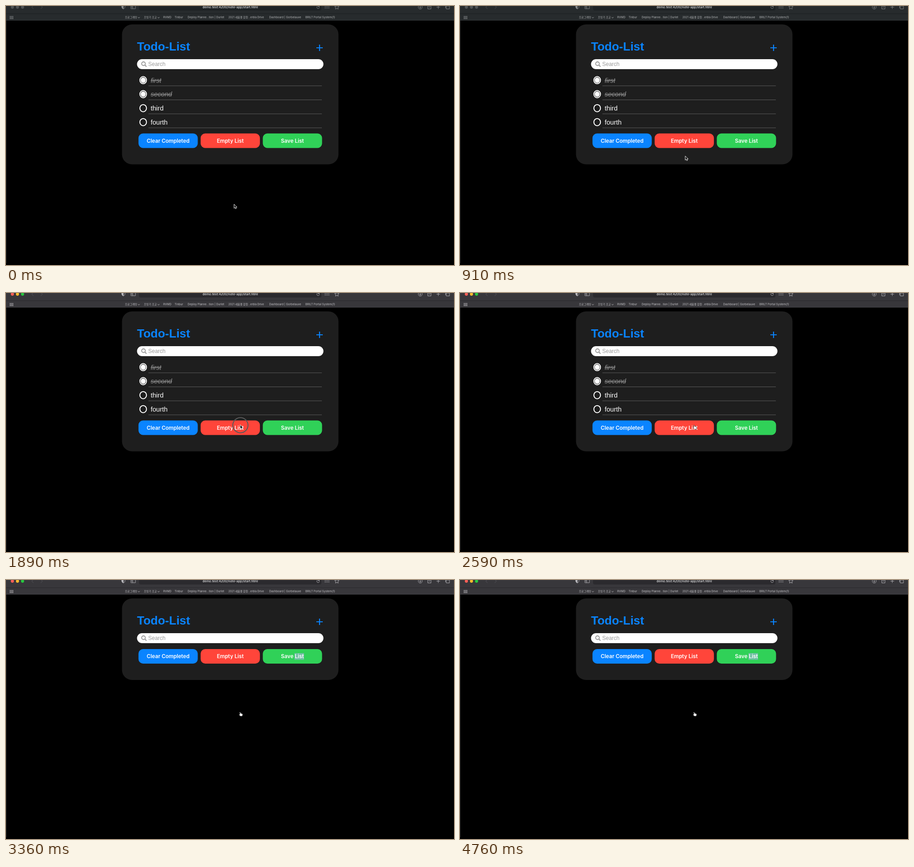
An HTML page for the animation above (5040 ms loop, 983x570 px).

```html
<!DOCTYPE html>
<html lang="en">
<head>
<meta charset="utf-8">
<title>Todo-List</title>
<style>
  html, body { margin: 0; width: 100%; height: 100%; overflow: hidden; background: #000; }
  svg { display: block; width: 983px; height: 570px; }
  text { font-family: "Liberation Sans", Arial, sans-serif; white-space: pre; }
  .ui { font-family: Inter, "Noto Sans CJK KR", "Noto Sans CJK", sans-serif; }
  .line { fill: none; stroke-linecap: round; stroke-linejoin: round; }

  #win { --bar: #272b2d; --field: #1e2224; --rule: #1b1e20; --edge: #34383a;
         --icon: #85888a; --dim: #4c5052; --mark: #b4b6b8;
         --l0: #505456; --l1: #505456; --l2: #505456; }
  #win.active { --bar: #38373b; --field: #2b2a2e; --rule: #29282c; --edge: #444347;
         --icon: #b5b4b8; --dim: #55545a; --mark: #c4c3c7;
         --l0: #ff5f57; --l1: #febc2e; --l2: #28c840; }
  #icons { stroke: var(--icon); stroke-width: .9; }
  #marks text { font-size: 6.1px; fill: var(--mark); }
  #marks .ko { font-size: 5.8px; }

  #items text { font-size: 14.5px; fill: #fff; }
  #items .done { fill: #8f8f8f; font-style: italic; text-decoration: line-through; }
  #buttons text { font-size: 11.6px; font-weight: 600; fill: #fff; text-anchor: middle; }
</style>
</head>
<body>
<svg viewBox="0 0 983 570">
  <rect width="983" height="570"/>
  <path d="M.5 32V566" stroke="#2b2b2b"/>

  <g id="win">
    <rect width="983" height="32" fill="var(--bar)"/>
    <path d="M0 17H983" stroke="var(--rule)"/>
    <path d="M0 31.5H983" stroke="var(--edge)"/>
    <rect x="292" y="-10" width="400" height="20" rx="4" fill="var(--field)"/>
    <circle cx="14" cy="2.5" r="3.4" fill="var(--l0)"/>
    <circle cx="25.2" cy="2.5" r="3.4" fill="var(--l1)"/>
    <circle cx="36.3" cy="2.5" r="3.4" fill="var(--l2)"/>
    <path class="line" stroke="var(--dim)" d="M60-1L56.5 2.5L60 6M76.5-1L80 2.5L76.5 6"/>
    <g id="icons" class="line">
      <path d="M257.5-2L261-1V2.5Q261 5 257.5 6.5Q254 5 254 2.5V-1Z"/>
      <path d="M257.5-2V6.5Q254 5 254 2.5V-1Z" fill="var(--icon)"/>
      <path d="M274.5-1H284V6H274.5ZM278-1V6M275.7 1H276.7M275.7 3H276.7"/>
      <path d="M687.3 1.2A2.9 2.9 0 1 0 687.8 3.2M687.5-.8V1.4H685.3"/>
      <path d="M726-2.4L727.4.8L731 1.2L728.3 3.5L729.1 7L726 5.2L722.9 7L723.7 3.5L721 1.2L724.6.8Z"/>
      <path d="M909-2A4.4 4.4 0 1 1 908.9-2M909 0V4.5M907 2.7L909 4.6L911 2.7"/>
      <path d="M927.5 0H925.5V6.5H932.5V0H930.5M929-2V3.5"/>
      <path d="M945 2.5H952M948.5-1V6"/>
      <path d="M966.5 0H973V6.5H966.5ZM964.5 4.5V-2H971"/>
      <path stroke-width="1.6" stroke-dasharray="0 2.8" d="M700.2 1.5H709M700.2 4.5H709"/>
    </g>
    <text class="ui" x="492" y="5.4" text-anchor="middle" font-size="7" font-weight="500" fill="#e4e5e6">demo.test:4200/note-app/start.html</text>
    <path stroke="var(--icon)" stroke-width="1.5" stroke-dasharray="2 .9" d="M8.3 23.1H16M8.3 25.4H16M8.3 27.7H16"/>
    <path class="line" stroke="var(--mark)" stroke-width=".9" d="M289.7 24.8L291.5 26.5L293.3 24.8M333 24.8L334.8 26.5L336.6 24.8"/>
    <g id="marks"></g>
  </g>

  <rect id="card" x="254.5" y="40.5" width="475" rx="22" fill="#1e1e1e"/>
  <text x="287.5" y="98" font-size="26" font-weight="700" fill="#0a84ff">Todo-List</text>
  <path d="M681 92H695M688 85V99" stroke="#0a84ff" stroke-width="2.2"/>
  <rect x="287.5" y="117" width="409" height="22" rx="11" fill="#fff"/>
  <g class="line" stroke="#969696" stroke-width="1.8">
    <circle cx="301.7" cy="127" r="4"/>
    <path d="M304.8 130L307.7 133"/>
  </g>
  <text x="312" y="132" font-size="12" fill="#9a9a9a">Search</text>

  <g id="items"></g>
  <g id="buttons"></g>

  <circle id="ring" cx="514.3" cy="291" fill="none"/>
  <path id="arrow" d="M0 0V9.2L2.1 7.3L3.5 10.3L5.1 9.6L3.8 6.7H6.6Z" fill="#111" stroke="#fff" stroke-width=".9" stroke-linejoin="round"/>
  <path id="hand" d="M512.6 291.2Q513.7 290 514.4 291.4L515 293.6Q516.2 292.9 516.6 293.9Q517.8 293.4 518 294.5Q519.4 294.2 519.3 296Q519.2 298 518.2 299.8H514.2Q512.4 297.9 511.3 296.2Q511.4 295 513.2 295.6Z"
        fill="#fff" stroke="#111" stroke-width=".7"/>
</svg>

<script>
const LOOP = 5040, STEP = 70;
const FOCUS = 1890, HOVER = 2450, EMPTIED = 2730;
const $ = id => document.getElementById(id);
const set = (el, attrs) => { for (const k in attrs) el.setAttribute(k, attrs[k]); };

const bookmarks = [
  [261, "프로그래밍", "ko"], [302.5, "프밍기 조교", "ko"], [345, "RVMD"], [370, "Tinbur"],
  [398.5, "Deploy Planne...tion | Durlet"], [488, "2021 새봄결 합창...erbla Drive", "ko"],
  [577.5, "Dashboard | Gorbelauve"], [657, "BRILT Portal System(1)"]
];
$("marks").innerHTML = bookmarks.map(([x, label, kind = ""]) =>
  `<text class="ui ${kind}" x="${x}" y="27.4">${label}</text>`).join("");

$("items").innerHTML = ["first", "second", "third", "fourth"].map((label, i) => {
  const done = i < 2;
  return `<g transform="translate(0 ${i * 30.8})">
    <ellipse cx="301" cy="163.2" rx="7.3" ry="7.9" fill="none" stroke="#fff" stroke-width="2"/>
    ${done ? '<ellipse cx="301" cy="163.2" rx="5.5" ry="6" fill="#fff"/>' : ""}
    <text x="317.5" y="168.6" class="${done ? "done" : ""}">${label}</text>
    <path d="M312.5 175.7H693" stroke="#5c5c5c"/></g>`;
}).join("");

const buttons = [["Clear Completed", "#0a84ff"], ["Empty List", "#ff453a"], ["Save List", "#30d158"]];
$("buttons").innerHTML = buttons.map(([label, color], i) => {
  const x = 290.7 + i * 136.4;
  return `<rect x="${x}" y="280.5" width="130" height="32" rx="10" fill="${color}"/>
    ${i == 2 ? '<rect id="selection" x="633" y="289.5" width="21" height="14.5" fill="#72c0a5"/>' : ""}
    <text class="ui" x="${x + 65}" y="300.8">${label}</text>`;
}).join("");

// Pointer path: time, x, y
const path = [[0, 500.3, 436], [140, 500.3, 420], [350, 499, 380.5], [420, 499, 380.5],
  [700, 495, 354], [910, 494.2, 330], [980, 497, 311], [1120, 508, 296], [1260, 513.8, 290]];

function pointerAt(t) {
  const i = path.findIndex(p => p[0] > t);
  if (i < 0) return path[path.length - 1].slice(1);
  const [a, b] = [path[i - 1], path[i]];
  const k = (t - a[0]) / (b[0] - a[0]);
  return [1, 2].map(n => a[n] + (b[n] - a[n]) * k);
}

// Click ring grows from its press time, then fades.
function drawRing(t) {
  const age = t >= EMPTIED ? t - EMPTIED + STEP : t - 1820;
  const grow = Math.min(1, age / STEP);
  const visible = age >= 0 && age < 280;
  set($("ring"), {
    r: 11.7 + 5 * grow, "stroke-width": 1.2 + .9 * grow,
    stroke: grow < 1 ? "#777" : "#5a5a5a",
    opacity: visible ? Math.min(1, (280 - age) / 210) : 0
  });
}

function draw(now) {
  const t = Math.floor((now % LOOP) / STEP) * STEP;
  const empty = t >= EMPTIED, hand = t >= HOVER;
  $("win").classList.toggle("active", t >= FOCUS);
  set($("card"), { height: empty ? 179.5 : 308 });
  set($("items"), { visibility: empty ? "hidden" : "visible" });
  set($("buttons"), { transform: `translate(0 ${empty ? -128.5 : 0})` });
  set($("selection"), { visibility: empty ? "visible" : "hidden" });
  set($("arrow"), { transform: `translate(${pointerAt(t)})`, visibility: hand ? "hidden" : "visible" });
  set($("hand"), { visibility: hand ? "visible" : "hidden" });
  drawRing(t);
}

const start = performance.now();
function tick() {
  draw(performance.now() - start);
  requestAnimationFrame(tick);
}
tick();
</script>
</body>
</html>
```
